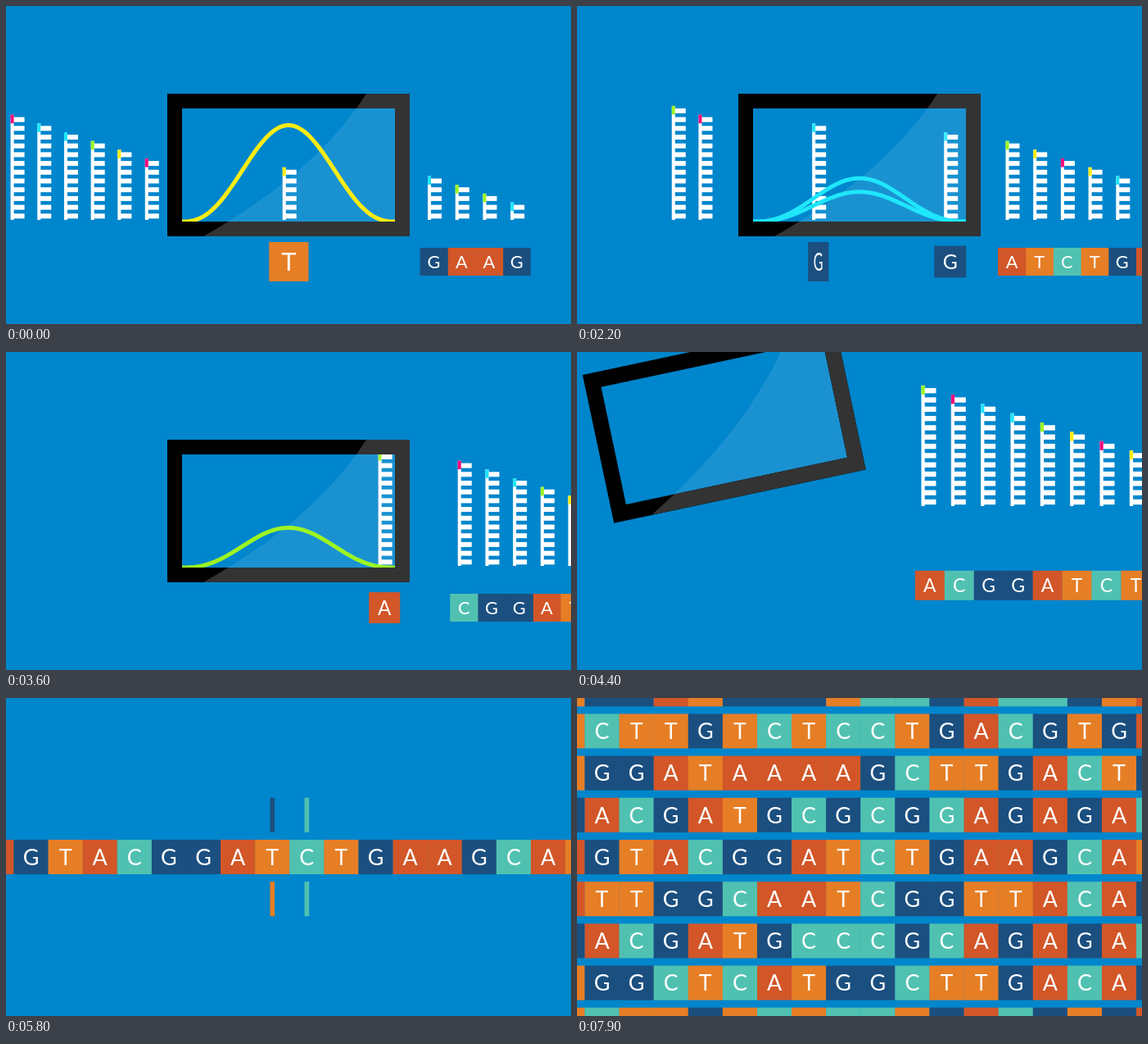
Recreate the animation shown at these times as an HTML page with a canvas. Size 690 by 388 pixels, loop 8000 ms.

```html
<!DOCTYPE html>
<html lang="en">
<head>
<meta charset="utf-8">
<title>Sequencing</title>
<style>
  html, body { margin: 0; width: 100%; height: 100%; overflow: hidden; background: #0086cc; }
  canvas { display: block; }
</style>
</head>
<body>
<canvas id="stage" width="690" height="388"></canvas>
<script>
const ctx = document.getElementById('stage').getContext('2d');
const LOOP = 8000;
const BG = '#0086cc';
const TILE = { A: '#d25628', C: '#50c1b1', G: '#1b4f80', T: '#e67e25' };
const DYE = { A: '#9cf522', C: '#f4087c', G: '#1fe6fb', T: '#fbec14' };

// Bases in the order they pass the detector, shortest strand first.
const STRANDS = 'GAAGTCTAGGCA';
const LAST = STRANDS.length - 1;
const ROWS = [
  'TGGATGGGTCCGACCGTA',
  'TCTTGTCTCCTGACGTGA',
  'TGGATAAAAGCTTGACTG',
  'GACGATGCGCGgAGAGAC',
  'AGTACGGATCTGAAGCAT',
  'ATTGGCAATCGGTTACAG',
  'GACGATGCCCGCAGAGAC',
  'TGGCTCATGGCTTGACAG',
  'TCTTGTCTCCTGACGTGA'
];
const MID = 4, COL = 42.1, PITCH = 51.2, FIRST = 30.5;

// Queue progress by time, in slots.
const QUEUE = [[0, 0], [900, 2.2], [1300, 2.7], [1800, 3.75], [2200, 4.37], [2700, 5.38]];
const TRAIN = [...QUEUE, [3600, 8.15]];
const TAIL = [...QUEUE, [3600, 7.43], [3900, 8.15]];
// Strand place, curve height and tile size by slot.
const PLACE = [[-15, -158], [-5, 169], [-4.63, 287], [-4, 337], [-3.63, 448], [-3, 515], [17, 1189]];
const PEAK = [[-5, 0], [-4.63, 36], [-4.3, 83], [-4, 118], [-3.63, 53], [-3.3, 30], [-3, 0]];
const WIDTH = [[-5, 0], [-4.63, 25], [-4.3, 40], [-4, 48], [-3.6, 38], [-3.3, 36], [-3, 34]];

const clamp = v => Math.max(0, Math.min(1, v));
const mix = (a, b, u) => a + (b - a) * u;

function at(table, v) {
  if (v <= table[0][0]) return table[0][1];
  for (let i = 1; i < table.length; i++) {
    const [x0, y0] = table[i - 1], [x1, y1] = table[i];
    if (v <= x1) return mix(y0, y1, (v - x0) / (x1 - x0));
  }
  return table[table.length - 1][1];
}

// Past the monitor each step starts slowly and catches up.
function place(p) {
  const lag = p > -3 ? 4.4 * Math.sin(Math.PI * (p - Math.floor(p))) : 0;
  return at(PLACE, p) - lag;
}

function rect(color, x, y, w, h) {
  ctx.fillStyle = color;
  ctx.fillRect(x, y, w, h);
}

// A lower-case base wears the colour of C.
function tile(base, cx, cy, w, h) {
  if (w < 0.3) return;
  const name = base.toUpperCase();
  rect(base === name ? TILE[base] : TILE.C, cx - w / 2, cy - h / 2, w + 0.2, h);
  if (w < h / 4) return;
  ctx.save();
  ctx.translate(cx, cy);
  ctx.scale(w / h, 1);
  ctx.fillStyle = '#fff';
  ctx.font = `${h * 0.64}px Lato, "Open Sans", sans-serif`;
  ctx.textAlign = 'center';
  ctx.fillText(name, 0, h * 0.235);
  ctx.restore();
}

function strand(k, x, base, s) {
  const step = 10.7, n = k + 2;
  ctx.save();
  ctx.translate(x, base);
  ctx.scale(s, s);
  rect('#fff', 0, -step * n, 4, step * n);
  for (let j = 1; j <= n; j++) rect('#fff', 3, 3 - step * j, 14, 6);
  rect(DYE[STRANDS[k]], 0, -step * n, 4, 10.5);
  ctx.restore();
}

function sheen() {
  ctx.beginPath();
  ctx.moveTo(440, 107);
  ctx.quadraticCurveTo(379, 203, 241, 281);
  ctx.lineTo(493, 281);
  ctx.lineTo(493, 107);
  ctx.closePath();
}

function wave(color, peak) {
  ctx.beginPath();
  for (let x = 0; x <= 260; x += 4) {
    ctx.lineTo(215 + x, 263 - peak * Math.sin(Math.PI * x / 260) ** 2.5);
  }
  ctx.strokeStyle = color;
  ctx.lineWidth = 5;
  ctx.stroke();
}

function monitor(e, slots) {
  ctx.save();
  ctx.translate(345 - 717 * e, 194 - 470 * e);
  ctx.rotate(-52 * e * Math.PI / 180);
  ctx.scale(1 + 0.27 * e, 1 + 0.27 * e);
  ctx.translate(-345, -194);

  ctx.save();
  ctx.beginPath();
  ctx.rect(215, 125, 260, 138);
  ctx.clip();
  sheen();
  ctx.fillStyle = 'rgba(255,255,255,.1)';
  ctx.fill();
  slots.forEach((p, k) => {
    const peak = at(PEAK, p);
    if (peak > 4) wave(DYE[STRANDS[k]], peak);
  });
  ctx.restore();

  ctx.beginPath();
  ctx.rect(197, 107, 296, 174);
  ctx.rect(215, 125, 260, 138);
  ctx.fillStyle = '#000';
  ctx.fill('evenodd');
  ctx.clip('evenodd');
  sheen();
  ctx.fillStyle = '#333';
  ctx.fill();
  ctx.restore();
}

function detector(t) {
  const slots = [...STRANDS].map((_, k) => at(k === LAST ? TAIL : TRAIN, t) - k);
  slots.forEach((p, k) => strand(k, place(p), 261, 1));
  monitor(0, slots);
  slots.forEach((p, k) => {
    const w = at(WIDTH, p);
    tile(STRANDS[k], place(p) + 7.5, 312, w, p < -4 ? 48 : w);
  });
}

// The camera turns away from the monitor and follows the row of bases.
function pan(t) {
  const e = (1 - Math.cos(Math.PI * clamp((t - 4000) / 1258))) / 2;
  const size = mix(34.1, COL, e);
  const x0 = mix(525.5, FIRST + 2 * COL, e), y = mix(312, 194, e);
  if (e < 1) {
    [...STRANDS].forEach((_, k) => {
      const x = x0 + (LAST - k) * (size + 1.7 * e) - 8.5 - 8 * e;
      strand(k, x, 261 - 317 * e, 1 + 0.25 * e);
    });
    monitor(e, []);
  }
  [...ROWS[MID]].forEach((base, i) => {
    const j = i - 3;
    const open = j < 0 ? clamp((t - 5200 + 70 * j) / 120) : 1;
    tile(base, x0 + j * size, y, size * open, size);
  });
}

// Rows turn open outward from the middle.
function spread(t) {
  ROWS.forEach((row, r) => {
    if (r === MID) return;
    const gap = Math.abs(r - MID);
    [...row].forEach((base, i) => {
      const side = Math.abs(i - 8.5) - 0.5;
      const u = clamp((t - 5776 - 400 * (gap - 1) - 65 * side) / 300);
      tile(base, FIRST + (i - 1) * COL, 194 + (r - MID) * PITCH, COL * Math.sin(u * Math.PI / 2), COL);
    });
  });
}

function draw(t) {
  rect(BG, 0, 0, 690, 388);
  if (t < 4000) detector(t);
  else pan(t);
  if (t > 5700) spread(t);
}

const start = performance.now();
function tick() {
  draw((performance.now() - start) % LOOP);
  requestAnimationFrame(tick);
}
tick();
</script>
</body>
</html>
```
